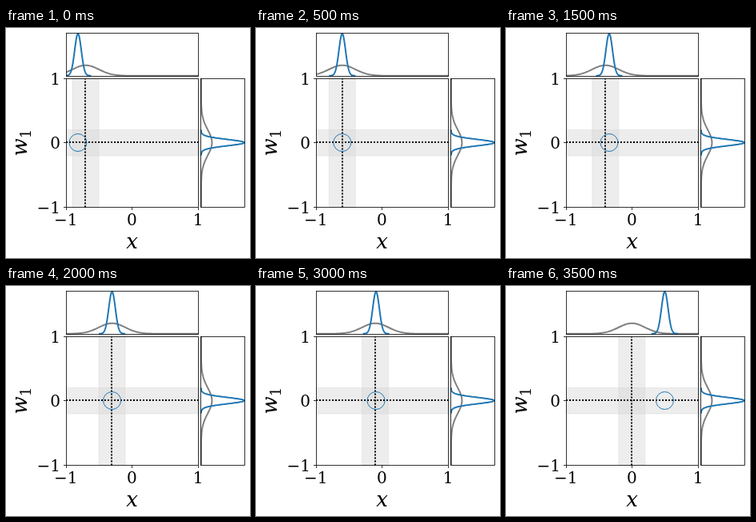
An HTML page for the animation above (6000 ms loop, 305 px wide and 288 px high).

```html
<!DOCTYPE html>
<html lang="en">
<head>
<meta charset="utf-8">
<title>Sampling x and w</title>
<style>
  html, body { margin: 0; width: 100%; height: 100%; overflow: hidden; background: #fff; }
  svg { display: block; width: 305px; height: 288px; }
  text { font-family: "DejaVu Serif", "Noto Serif", serif; font-size: 20px; }
  .label { font-size: 26px; font-style: italic; }
  .label .sub { font-size: 18.2px; font-style: normal; }
  .mid { text-anchor: middle; }
  .end { text-anchor: end; }
  .axis { fill: none; stroke: #000; stroke-width: .8; }
  .band { fill: #d3d3d3; stroke: #d3d3d3; opacity: 1; fill-opacity: .4; stroke-opacity: .4; }
  .dots { stroke: #000; stroke-width: 2; stroke-dasharray: 2 2; }
  .prior, .post { fill: none; stroke-width: 2; stroke-linejoin: round; }
  .prior { stroke: #808080; }
  .post { stroke: #1f77b4; }
  .ring { fill: none; stroke: #1f77b4; stroke-width: 1; }
</style>
</head>
<body>
<svg viewBox="0 0 305 288" xmlns="http://www.w3.org/2000/svg">
  <defs>
    <clipPath id="mainClip"><rect x="75" y="63" width="166" height="162"/></clipPath>
    <clipPath id="topClip"><rect x="75" y="6" width="166" height="55"/></clipPath>
    <clipPath id="sideClip"><rect x="243" y="63" width="56" height="162"/></clipPath>
  </defs>

  <g clip-path="url(#mainClip)">
    <rect id="bandX" class="band" y="63.5" width="33" height="161"/>
    <rect class="band" x="75.5" y="127.5" width="165" height="32.5"/>
    <path id="lineX" class="dots"/>
    <path class="dots" d="M75 143H240.5"/>
    <circle id="ring" class="ring" cy="143.5" r="11"/>
  </g>
  <g clip-path="url(#topClip)">
    <path id="priorX" class="prior"/>
    <path id="postX" class="post"/>
  </g>
  <g clip-path="url(#sideClip)">
    <path id="priorW" class="prior"/>
    <path id="postW" class="post"/>
  </g>

  <g class="axis">
    <rect x="75.5" y="63.5" width="165" height="161"/>
    <rect x="75.5" y="6.5" width="165" height="54"/>
    <rect x="243.5" y="63.5" width="55" height="161"/>
    <path d="M72 63.5h3.5M72 143.5h3.5M72 224.5h3.5M75.5 224.5v3.5M157.5 224.5v3.5M240.5 224.5v3.5"/>
  </g>

  <text class="end" x="68" y="71">1</text>
  <text class="end" x="68" y="151">0</text>
  <text class="end" x="68" y="231.5">−1</text>
  <text class="mid" x="74.8" y="247">−1</text>
  <text class="mid" x="157.3" y="247">0</text>
  <text class="mid" x="240" y="247">1</text>
  <text class="label mid" x="157.5" y="276">x</text>
  <text class="label mid" transform="translate(26 143.5) rotate(-90)">w<tspan class="sub" dy="4.5">1</tspan></text>
</svg>

<script>
  const STEP = 500, LOOP = 6000;
  const CX = 157.3, CY = 143.5, UX = 82.5, UY = 80.4;
  const WIDE = 0.2, NARROW = 0.05;
  const samples = [-0.816, -0.6, -0.476, -0.343, -0.3, -0.264, -0.088, 0.499];

  const el = id => document.getElementById(id);
  const set = (id, name, value) => el(id).setAttribute(name, value);
  const px = v => CX + v * UX;

  // Bell curve from a to b; place() turns value and relative height into a point.
  function bell(mean, sigma, a, b, place) {
    const n = 160, pts = [];
    for (let i = 0; i <= n; i++) {
      const v = a + (b - a) * i / n;
      const h = NARROW / sigma * Math.exp(-(((v - mean) / sigma) ** 2) / 2);
      pts.push(place(v, h).map(c => c.toFixed(2)).join(" "));
    }
    return "M" + pts.join("L");
  }
  const onTop = (v, h) => [px(v), 59.8 - 52.6 * h];
  const onSide = (v, h) => [244 + 53.8 * h, CY - v * UY];

  function show(step) {
    const mean = (step - 7) / 10, x = samples[step];
    const lineX = Math.round(157 + mean * UX);
    set("bandX", "x", px(mean - WIDE));
    set("lineX", "d", `M${lineX} 224.5V63.5`);
    set("ring", "cx", px(x));
    set("priorX", "d", bell(mean, WIDE, -1, 1.02, onTop));
    set("postX", "d", bell(x, NARROW, x - 4 * NARROW, x + 4 * NARROW, onTop));
  }

  set("priorW", "d", bell(0, WIDE, -1, 1, onSide));
  set("postW", "d", bell(0, NARROW, -4 * NARROW, 4 * NARROW, onSide));

  let shown = -1;
  const start = performance.now();
  function tick() {
    const t = (performance.now() - start) % LOOP;
    const step = Math.min(samples.length - 1, Math.floor(t / STEP));
    if (step !== shown) show(shown = step);
    requestAnimationFrame(tick);
  }
  tick();
</script>
</body>
</html>
```
